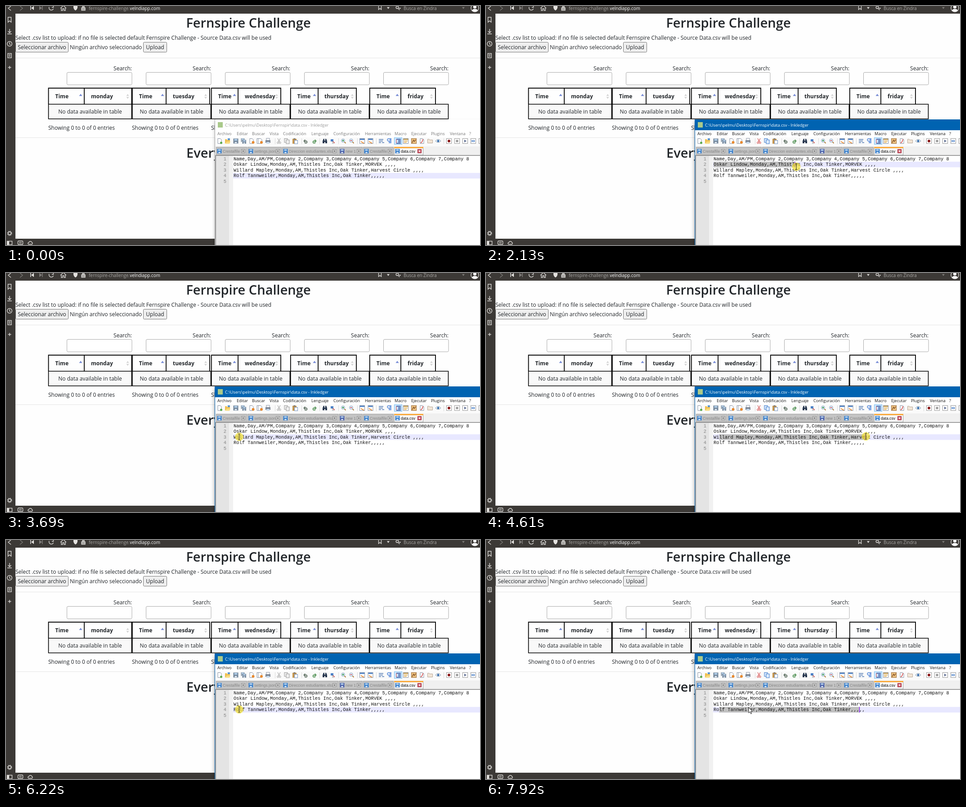
An HTML page that plays this animation: 1054 px wide and 531 px high, repeating every 7.99 s.

```html
<!DOCTYPE html>
<html lang="es">
<head>
<meta charset="utf-8">
<title>CSV upload</title>
<style>
html, body { margin: 0; width: 100%; height: 100%; overflow: hidden; background: #fefefe; }
svg { display: block; width: 1054px; height: 531px; }
text { font-family: "Open Sans", "Noto Sans", sans-serif; font-size: 12px; fill: #212529; white-space: pre; }
.b { font-weight: 700; }
.h { font-size: 29px; font-weight: 600; }
.url { font-size: 9.9px; fill: #a9a7a4; }
.mid { text-anchor: middle; }
.end { text-anchor: end; }
.mono text, text.mono { font-family: "Liberation Mono", "Courier New", monospace; font-size: 10.4px; fill: #111; }
.mono text.num { fill: #858585; }
.tab { font-family: "Liberation Sans", Arial, sans-serif; font-size: 8.6px; fill: #858585; }
.menu text { font-size: 9.1px; fill: #777; }
.ln { fill: none; stroke: #d8d6d3; stroke-width: 1.4; }
.dim { opacity: .4; }
#bar { fill: #fff; }
#title { font-size: 9.2px; fill: #999; }
#frame { fill: #fff; stroke: #a8a8a8; filter: drop-shadow(0 4px 3px rgba(0,0,0,.25)); }
.on #bar { fill: #0063b1; }
.on #title { fill: #fff; }
.on #frame { stroke: #0063b1; filter: drop-shadow(0 5px 4px rgba(0,0,0,.4)); }
.on .menu text { fill: #111; }
.edit { stroke: #999; fill: #eee; }
.sel .cut { stroke: #d03030; }
.sel .copy { stroke: #3a78c8; fill: #dcebff; }
</style>
</head>
<body>
<svg viewBox="0 0 1054 531">
  <rect width="1054" height="531" fill="#fefefe"/>
  <g id="page"></g>
  <g id="chrome"></g>
  <g id="win">
    <rect id="frame" x="464.5" y="252.5" width="600" height="290"/>
    <rect id="bar" x="465" y="252" width="589" height="24"/>
    <rect x="471" y="258" width="11" height="12" fill="#a9c98a"/>
    <text id="title" x="487" y="267.5">C:\Users\pelmu\Desktop\Fernspir\data.csv - Inkledger</text>
    <g class="menu" id="menu"></g>
    <rect x="465" y="292" width="589" height="20" fill="#fafafa"/>
    <g id="tools"></g>
    <rect x="465" y="312" width="589" height="20" fill="#f0f0f0"/>
    <g id="tabs"></g>
    <rect x="466" y="332" width="30" height="199" fill="#e4e4e4"/>
    <rect x="496" y="332" width="9" height="199" fill="#f1f1f1"/>
    <rect x="505" y="332" width="549" height="199" fill="#fff"/>
    <path d="M466.2 531V332H1054" fill="none" stroke="#838383" stroke-width="1.6"/>
    <rect id="row" x="505" width="549" height="12.5" fill="#e8e8ff"/>
    <rect id="mark" height="12.5" fill="#c0c0c0"/>
    <g id="code" class="mono"></g>
    <rect id="caret" width="1.2" height="12.5" fill="#8000ff"/>
  </g>
  <g id="mouse">
    <circle id="spot" r="9.3" fill="#f5e12a" opacity=".68"/>
    <path id="beam" d="M-2.5 -6.5H-.8L0 -5.8L.8 -6.5H2.5M0 -5.8V5.8M-2.5 6.5H-.8L0 5.8L.8 6.5H2.5" fill="none" stroke="#222"/>
    <path id="arrow" d="M0 0V12.2L2.9 9.6L4.9 14.3L6.8 13.5L4.8 8.9H8.7Z" fill="#fff" stroke="#111" stroke-width=".9"/>
  </g>
</svg>
<script>
const $ = id => document.getElementById(id);
const put = (id, parts) => { $(id).innerHTML = parts.join(''); };
const text = (x, y, s, cls = '') => `<text x="${x}" y="${y}" class="${cls}">${s}</text>`;
const box = (x, y, w, h, fill, more = '') => `<rect x="${x}" y="${y}" width="${w}" height="${h}" fill="${fill}" ${more}/>`;
const path = (d, more = 'class="ln"') => `<path d="${d}" ${more}/>`;
const fill = c => `fill="${c}"`;
const line = (c, w = 1) => `fill="none" stroke="${c}" stroke-width="${w}"`;

// Web page
const button = (x, w, s) =>
  box(x + .5, 80.5, w - 1, 22, '#efefef', 'rx="2" stroke="#767676"') + text(x + w / 2, 96, s, 'mid');

function table([day, split, right, dayX], i) {
  const end = 280 + i * 176, left = i ? end - 175.2 : 94.5, edge = end - .5;
  const up = split - 8, both = right - 9;
  return text(end, 143, 'Search:', 'end')
    + box(end - 144.5, 147.5, 144.5, 27.5, '#fff', 'rx="2.5" stroke="#aaa"')
    + box(left, 218, edge - left, 32.5, '#f9f9f9')
    + path(`M${left} 218V182.5H${right}V218M${split} 182.5V218`, line('#000', 1.8))
    + path(`M${left} 218.3H${edge}V250.8H${left}Z`, line('#000', 1.6))
    + text(left + 15, 205, 'Time', 'b') + text(dayX, 205, day, 'b')
    + path(`M${up - 3.5} 200L${up} 195L${up + 3.5} 200Z`, fill('#7b8fd8'))
    + path(`M${both - 3} 199.8L${both} 195.5L${both + 3} 199.8ZM${both - 3} 202L${both} 206.3L${both + 3} 202Z`, fill('#d3d3d3'))
    + text((left + edge) / 2, 239, 'No data available in table', 'mid')
    + text(i ? end - 176 : 94, 275, 'Showing 0 to 0 of 0 entries');
}

put('page', [
  text(539, 48, 'Fernspire Challenge', 'h mid'),
  text(21, 75, 'Select .csv list to upload: if no file is selected default Fernspire Challenge - Source Data.csv will be used'),
  button(21, 118, 'Seleccionar archivo'), text(142, 96, 'Ningún archivo seleccionado'), button(305, 53, 'Upload'),
  path('M21 115.5H1054M21 292.5H1054', line('#e4e4e4')),
  ...[['monday', 174, 279.5, 189], ['tuesday', 356, 453, 371], ['wednesday', 516, 611, 531],
    ['thursday', 694, 779, 708], ['friday', 878, 955, 893]].map(table),
  text(401, 337, 'Every company', 'h')
]);

// Browser frame
const white = fill('#e4e2df');
put('chrome', [
  box(0, 0, 1054, 17, '#3c3936'), box(0, 0, 21, 531, '#3c3936'), box(0, 517, 465, 14, '#3c3936'),
  path('M11 0L5 5L11 10M96 2A4.6 4.6 0 1 0 105.5 6M105.5 0V3H102'),
  path('M31 0L37 5L31 10', 'class="ln dim"'),
  path('M54 0H55.5V9H54ZM62 0V9L56 4.5Z', white),
  path('M74 0V9L80 4.5ZM80 0H81.5V9H80Z', white + ' class="dim"'),
  path('M121 5L127.5 -1L134 5M123 4V10H126V6H129V10H132V4'),
  path('M150 0H159V4Q158 8 154.5 10Q151 8 150 4Z', white),
  path('M168 4H176V9.5H168ZM170 4V1.5A2 2 0 0 1 174 1.5V4', 'class="ln" style="fill:#a09e9b"'),
  `<text x="184" y="9" class="url">fernspire-challenge.<tspan fill="#fff">velndiapp.com</tspan></text>`,
  path('M828.5 0V8L831.5 5.5L834.5 8V0'),
  path('M847 2.5H853L850 6.5ZM874 4H878L876 7Z', white),
  path('M1014 2.5H1020L1017 6.5Z', white + ' class="dim"'),
  '<circle cx="870" cy="3" r="2.8" class="ln"/>', path('M872 5L875 9'),
  text(884, 9, 'Busca en Zindra', 'url'),
  '<circle cx="1042.5" cy="4.5" r="8.6" class="ln"/><circle cx="1042.5" cy="2" r="3.6" fill="#fff"/>',
  path('M1036 10.5Q1037 6.5 1042.5 6.5Q1048 6.5 1049 10.5Q1042.5 15 1036 10.5Z', fill('#fff')),
  path('M4.5 25H11.5V36L8 33L4.5 36ZM8 51V59M4.5 56L8 59.5L11.5 56M3 62H13'),
  '<circle cx="8" cy="84" r="5.3" class="ln"/>', path('M8 80.5V84.5L10.5 86'),
  path('M4 105.5H12V115H4ZM6 108.5H10M6 111.5H10M8 133V140M4.5 136.5H11.5'),
  '<circle cx="8" cy="505" r="3.2" class="ln" stroke-width="2"/><circle cx="8" cy="505" r="4.8" class="ln" stroke-dasharray="2 1.77"/>',
  box(2.5, 522.5, 11, 8, 'none', 'class="ln"'), box(3, 523, 4, 7, '#e4e2df'),
  box(26.5, 522, 11, 8, 'none', 'class="ln" rx="2"'), path('M30.5 524V528M33.5 524V528'),
  path('M50.5 529.5H57.5A2.5 2.5 0 0 0 57.5 525A3.7 3.7 0 0 0 51 525A2.3 2.3 0 0 0 50.5 529.5Z')
]);

// Editor window
const menus = { Archivo: 470, Editar: 513, Buscar: 547, Vista: 586, Codificación: 616, Lenguaje: 679,
  Configuración: 728, Herramientas: 798, Macro: 864, Ejecutar: 901, Plugins: 945, Ventana: 987, '?': 1030 };
put('menu', Object.entries(menus).map(([s, x]) => text(x, 287, s)));

const sheet = (x, more = 'fill="#fff" stroke="#8a94a5"') => path(`M${x - 4} 294.5H${x + 1.5}L${x + 4} 297V305.5H${x - 4}Z`, more);
const disk = (x, y, s, c) => box(x, y, s, s, c) + box(x + s * .2, y + s * .1, s * .6, s * .32, '#b4d2ee') + box(x + s * .28, y + s * .68, s * .44, s * .25, '#e4eef8');
const dot = (x, y, r, c) => `<circle cx="${x}" cy="${y}" r="${r}" fill="${c}"/>`;
const lens = (x, c, d) => `<circle cx="${x - 1}" cy="299" r="3.8" fill="#e3f0ff" stroke="#8aa4c0"/>`
  + path(`M${x + 2} 302L${x + 5} 305`, line('#b08040', 2)) + path(d, line(c, 1.6));
const panel = (x, c) => box(x - 5.5, 294.5, 11, 11, '#fff', 'stroke="#8a94a5"') + box(x - 5, 295, 10, 2.5, c);
const key = x => box(x - 5.5, 294.5, 11, 11, '#fff', 'stroke="#9a9a9a"');
const copySheet = (x, y) => `<rect x="${x}" y="${y}" width="7" height="8.5" class="edit copy"/>`;

put('tools', [
  path([598, 657, 697, 739, 781, 823, 973].map(x => `M${x}.5 294V307`).join(''), line('#d8d8d8')),
  sheet(475), dot(478.5, 304, 2.5, '#58a848'),
  path('M487 305V296H491L492 298H498V305Z', fill('#f0c050')), path('M491 301H499L496.5 306H487Z', fill('#f7dc85')), box(493, 294, 5, 4, '#5a94d0'),
  disk(505.5, 294.5, 11, '#75889c'),
  disk(522.5, 294, 8, '#8fa0b0'), disk(525.5, 297.5, 8.5, '#75889c'),
  sheet(546), dot(549.5, 303, 3, '#e88a30'),
  sheet(562), sheet(565), dot(568, 303, 3, '#e88a30'),
  box(577, 298, 11, 6, '#7f8894'), box(579, 294, 7, 4.5, '#fff', 'stroke="#8a94a5"'), box(579, 302, 7, 4, '#c8dcf0'),
  path('M604 294L608.5 302M610 294L605.5 302M605.5 302A1.8 1.8 0 1 0 604 305.5A1.8 1.8 0 0 0 605.5 302M608.5 302A1.8 1.8 0 1 1 610 305.5A1.8 1.8 0 0 1 608.5 302', 'class="edit cut" style="fill:none"'),
  copySheet(619, 294.5), copySheet(623, 297.5),
  box(637, 295, 9, 11, '#c89850'), box(639.5, 294, 4, 2.5, '#777'), box(641.5, 298.5, 7, 7.5, '#fff', 'stroke="#6f90c0"'),
  path('M663 300H668A2.5 2.5 0 0 1 668 304.5H664M665.5 297L662.5 300L665.5 303', line('#66776a', 2)),
  path('M689 300H684A2.5 2.5 0 0 0 684 304.5H688M686.5 297L689.5 300L686.5 303', line('#5f9a62', 2)),
  path('M704 305V300L706 295H708V299H710V295H712L714 300V305H710V302H708V305Z', fill('#283850')),
  path('M722 296H728V301H722Z', fill('#4a80c8')), text(725, 305.5, 'b', 'tab'), path('M727 301L731 304.5', line('#d05050', 1.6)),
  lens(750.5, '#3a9a48', 'M749.5 297V301M747.5 299H751.5'), lens(768.5, '#d04848', 'M765.5 299H769.5'),
  panel(792, '#4a80c8'), path('M789 301L796 305', line('#e88a30', 2)), panel(810.5, '#4a80c8'), path('M807 301L814 305', line('#e88a30', 2)),
  path('M829 296.5H839M829 300H838M829 303.5H834M836 303.5H841', line('#4a74b0', 1.6)),
  path('M854 305V295H850.5A2.4 2.4 0 0 0 850.5 300H852V305M856 295V305M852 295H857', line('#4a80d8', 1.3)),
  box(863.5, 292.5, 17, 15, '#cce8ff', 'stroke="#7fc0f0"'), path('M868 296H878M872 299H878M872 302H878M868 305H878', line('#1e3c90', 1.6)), path('M868 296V305', line('#e04040')),
  panel(889, '#c8a050'), path('M885 300H893M885 303H891', line('#e0a840', 1.6)),
  box(901.5, 294.5, 11, 11, '#eec483', 'stroke="#9a6a38"'), path('M903 304L906 298L908 301L911 297', line('#805028', 1.4)),
  sheet(925), path('M922 304Q926 303 927 296', line('#d04040', 1.6)),
  path('M937.5 304.5V296H941L942 297.5H948.5V304.5Z', 'fill="#f2e6d8" stroke="#b8a898"'),
  path('M955 300Q961 293 967 300Q961 306 955 300Z', 'fill="#fff" stroke="#7890a8"'), dot(961, 300, 2.4, '#3a70b0'),
  [985, 1003, 1021, 1039, 1057].map(key).join(''),
  dot(985, 300, 3, '#8a1818'), box(1000.5, 297.5, 5, 5, '#999'), path('M1019 297V303L1024 300Z', fill('#5a6a90')),
  path('M1035.5 297V303L1039 300ZM1039.5 297V303L1043 300Z', fill('#4a80c8'))
]);

const tab = ([s, x, w, hot], i) =>
  box(x + .5, 313.5, w - 1, 17.5, hot ? '#f7f7f7' : '#c4c4c4', 'stroke="#a2a2a2"')
  + (hot ? box(x, 313, w, 3, '#faaa3c') : '')
  + disk(x + 2.5, 317.5, 10, i === 3 ? '#4a5fa8' : '#3a80cc')
  + text(x + 15, 326, s, 'tab" style="' + (hot ? 'fill:#111' : ''))
  + box(x + w - 12.5, 318.5, 8, 8, hot ? '#c8485a' : '#d8d8d8', `stroke="${hot ? '#a03040' : '#909090'}"`)
  + path(`M${x + w - 10.5} 320.5L${x + w - 6.5} 324.5M${x + w - 6.5} 320.5L${x + w - 10.5} 324.5`, line(hot ? '#fff' : '#777', 1.1));
put('tabs', [['Crestalfile', 467, 69], ['settings.json', 537, 76], ['Direccion estudiantes.xlsx', 614, 125],
  ['new 1', 740, 53], ['Crestalfile', 794, 68], ['data.csv', 863, 65, true]].map(tab));

const LEFT = 506, CHAR = 6.24, TOP = 333.3, LINE = 12.5;
const lines = ['Name,Day,AM/PM,' + [2, 3, 4, 5, 6, 7, 8].map(n => 'Company ' + n).join(),
  'Oskar Lindow,Monday,AM,Thistles Inc,Oak Tinker,MORVEK ,,,,',
  'Willard Mapley,Monday,AM,Thistles Inc,Oak Tinker,Harvest Circle ,,,,',
  'Rolf Tannweiler,Monday,AM,Thistles Inc,Oak Tinker,,,,,', ''];
put('code', lines.map((s, i) => {
  const y = TOP + 9.2 + i * LINE;
  return text(490, y, i + 1, 'num end') + text(LEFT, y, s);
}));

// Motion: time, x, y, easing towards this point
const ease = { lin: k => k, smooth: k => k * k * (3 - 2 * k), out: k => 1 - (1 - k) ** 2, jump: k => +(k >= 1) };
const stops = [
  [130, 957, 511], [900, 592, 349.5, 'out'], [1210, 511.5, 346.5, 'smooth'], [1430, 509, 346.5, 'jump'],
  [1740, 509, 346.5], [1825, 520, 350], [2135, 690, 357], [2360, 736, 354], [2590, 800.5, 354, 'out'],
  [2750, 800.5, 354], [3520, 518.5, 364, 'smooth'], [3760, 518.5, 364], [4460, 838.5, 363, 'smooth'],
  [4610, 845, 363], [5000, 877.5, 363, 'smooth'], [5080, 877.5, 363], [5920, 526, 374, 'smooth'],
  [6070, 518.5, 376.5], [6300, 518.5, 376.5], [7000, 813.5, 377, 'smooth'], [7150, 827.5, 377, 'out'],
  [7400, 827.5, 377], [7910, 584, 372, 'smooth']
];
const drags = [
  { row: 1, from: 0, down: 1740, up: 2800, off: 3020 },
  { row: 2, from: 2, down: 3670, up: 5130, off: 5500 },
  { row: 3, from: 2, down: 6215, up: 7280, off: 7420 }
];

function pointer(t) {
  const i = stops.findIndex(s => s[0] > t);
  if (i < 0) return stops.at(-1).slice(1, 3);
  if (!i) return stops[0].slice(1);
  const [t0, x0, y0] = stops[i - 1], [t1, x1, y1, e = 'lin'] = stops[i];
  const k = ease[e]((t - t0) / (t1 - t0));
  return [x0 + (x1 - x0) * k, y0 + (y1 - y0) * k];
}

const LOOP = 7990, STEP = 77.13, FIRST = 130;
const show = (id, yes) => $(id).setAttribute('visibility', yes ? 'visible' : 'hidden');
const set = (id, attrs) => { for (const a in attrs) $(id).setAttribute(a, attrs[a]); };

function draw(now) {
  // The screen ticks at about 13 pictures a second
  const t = now < FIRST ? now : FIRST + Math.floor((now - FIRST + 14) / STEP) * STEP;
  const [x, y] = pointer(t);
  const drag = drags.findLast(d => t >= d.down);
  const row = drag ? drag.row : 3, top = TOP + row * LINE;
  let a = 0, b = 0;
  if (drag) {
    a = drag.from;
    b = Math.max(a, Math.round((pointer(Math.min(t, drag.up))[0] - LEFT) / CHAR));
  }
  const pressed = !!drag && t < drag.up;
  const over = !!drag && !pressed && y >= top && y < top + LINE && x >= LEFT + a * CHAR && x <= LEFT + b * CHAR + 3;

  $('win').setAttribute('class', (drag ? 'on' : '') + (b > a ? ' sel' : ''));
  set('row', { y: top });
  set('mark', { x: LEFT + a * CHAR, y: top, width: (b - a) * CHAR });
  set('caret', { x: LEFT + b * CHAR - .6, y: top });
  show('caret', drag && !(t >= drag.off && t < drag.off + 485));
  set('mouse', { transform: `translate(${x} ${y})` });
  const seen = t >= FIRST;
  show('spot', pressed);
  show('beam', seen && !over);
  show('arrow', seen && over);
}

const start = performance.now();
function tick() {
  draw((performance.now() - start) % LOOP);
  requestAnimationFrame(tick);
}
tick();
</script>
</body>
</html>
```
